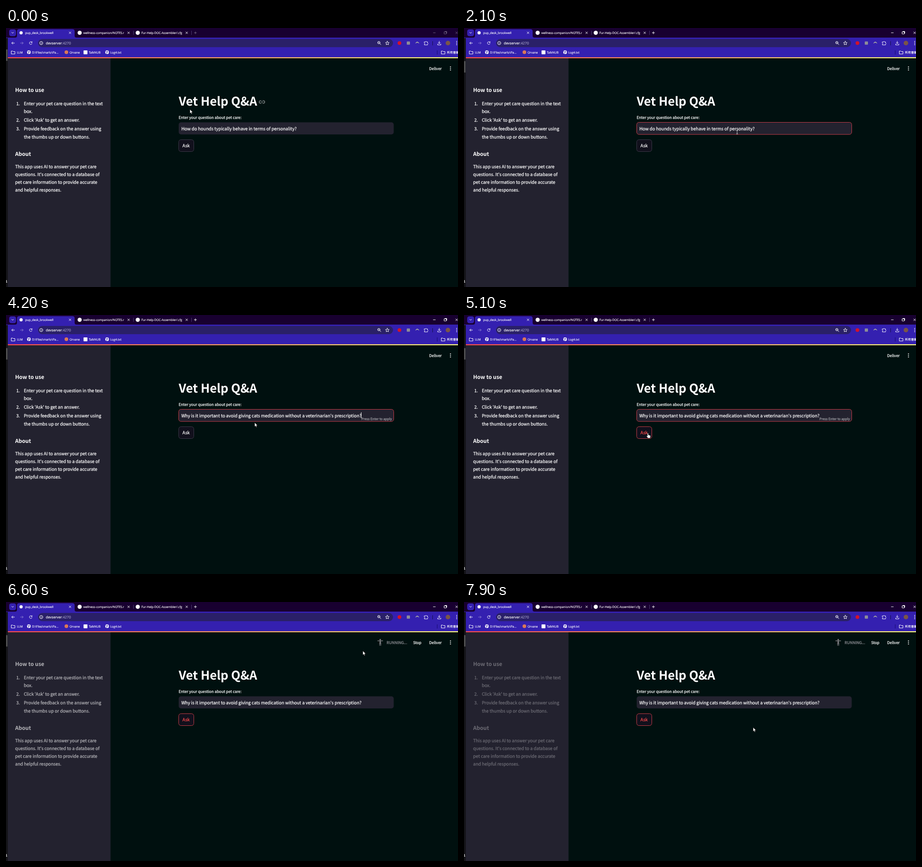
An HTML page for the animation above (8 s loop, 988 by 567 pixels).

```html
<!DOCTYPE html>
<html lang="en">
<head>
<meta charset="utf-8">
<title>Help desk demo</title>
<style>
html, body { margin: 0; width: 100%; height: 100%; overflow: hidden; background: #00100f; }
svg { display: block; }
text { color: #fff; fill: currentColor; stroke: currentColor; stroke-width: .25; white-space: pre; text-rendering: geometricPrecision; }
.page text { font: 9.6px "Noto Sans CJK SC", "Noto Sans CJK JP", "Noto Sans", sans-serif; }
.page .small { font-size: 8.4px; }
.page .head { font-size: 11.7px; font-weight: 600; stroke: none; }
.page .title { font-size: 26.4px; font-weight: 700; stroke: none; }
.page .hint { font-size: 7.2px; color: #a0a0a6; }
.page .muted { color: #929298; }
.chrome text { font: 6.5px "Open Sans", "Noto Sans CJK TC", "Noto Sans", sans-serif; stroke-width: .15; }
.chrome .url { font-size: 7.7px; }
.line { fill: none; stroke: #fff; stroke-width: 1; stroke-linecap: round; stroke-linejoin: round; }
.runner { fill: none; stroke: #7c7c80; stroke-width: 1.3; stroke-linecap: round; stroke-linejoin: round; }
.runner circle.dot { fill: #7c7c80; stroke: none; }
.cursor { fill: #fff; stroke: #000; stroke-width: .6; stroke-linejoin: round; }
</style>
</head>
<body>
<svg width="988" height="567" viewBox="0 0 988 567">
  <defs>
    <linearGradient id="rainbow"><stop stop-color="#ff4b4b"/><stop offset="1" stop-color="#fffd80"/></linearGradient>
    <g id="close"><path class="line" d="M-2-2L2 2M2-2L-2 2"/></g>
    <g id="folder"><path class="line" d="M-4 3V-3H-1L0-2H4V3Z"/></g>
    <g id="globe"><circle r="4" fill="#fff"/><path d="M-3-1Q0-2-.5 1T-1 3M1-3Q0 0 3 0" fill="none" stroke="#3420b0" stroke-width="1.1"/></g>
  </defs>

  <g class="chrome">
    <rect width="988" height="22" fill="#180030"/>
    <rect y="21" width="988" height="44" fill="#3420b0"/>
    <path d="M20 21Q24 21 24 17V7Q24 2.500 29 2.500H145Q150 2.500 150 7V17Q150 21 154 21Z" fill="#3420b0"/>
    <rect x="7" y="3" width="15" height="15" rx="4.500" fill="#3420b0"/>
    <path class="line" d="M12.500 9.500L14.500 11.500L16.500 9.500"/>
    <circle cx="33" cy="10.500" r="3.500" fill="#fff"/>
    <circle cx="161" cy="10.500" r="4.500" fill="#fff"/>
    <circle cx="288" cy="10.500" r="4.500" fill="#fff"/>
    <text x="42" y="12.800">pup_desk_brookwell</text>
    <svg x="169" y="0" width="89" height="21"><text y="12.800">wellness-companion/NOTES.md</text></svg>
    <svg x="296" y="0" width="89" height="21"><text y="12.800">Fur-Help-DOC-Assembler/.cfg</text></svg>
    <use href="#close" x="140" y="10.500"/>
    <use href="#close" x="268" y="10.500"/>
    <use href="#close" x="395" y="10.500"/>
    <path d="M278.500 6V15M405.500 6V15" stroke="#4a3a70"/>
    <g id="controls">
      <path class="line" d="M411.500 10.500H416.500M414 8V13M934 10.500H938.500M958 8.500H962.500V13H958ZM959.500 8.500V7.500H963.500V11.500"/>
      <use href="#close" x="985" y="10.500"/>
    </g>

    <rect x="70" y="24" width="776" height="18" rx="9" fill="#2a2068"/>
    <path class="line" d="M18.500 33H12.500M15 30.500L12.500 33L15 35.500M56.800 31.500A3 3 0 1 0 57 34M57 29.800V31.800H55"/>
    <path class="line" opacity=".4" d="M31.500 33H37.500M35 30.500L37.500 33L35 35.500"/>
    <circle class="line" cx="77" cy="33" r="3.500"/>
    <path class="line" d="M77 33V34.600M77 31.300V31.400"/>
    <text class="url" x="87" y="35.800">devserver<tspan style="color:#a9a4cc">:4270</tspan></text>
    <circle class="line" cx="815" cy="32" r="2.600"/>
    <path class="line" d="M817 34L819.500 36.500M814 32H816M833.500 29L834.700 31.800L837.500 32L835.400 34L836 36.800L833.500 35.300L831 36.800L831.600 34L829.500 32L832.300 31.800Z"/>
    <circle cx="860" cy="33" r="4" fill="#d3122a"/>
    <rect x="876" y="29.500" width="7" height="7" rx="1" fill="#8d8d98"/>
    <path d="M894.500 34Q899 26 903.500 34L899 32Z" fill="#a9a9a4"/>
    <path class="line" d="M914.500 30.500H917Q918 27.500 919.500 30.500H921.500V33Q924 34 921.500 35.500V37H914.500V35Q917 34 914.500 32.500Z"/>
    <path d="M932.500 29V38" stroke="#15104a"/>
    <path class="line" d="M947 29V34M944.800 32L947 34.200L949.200 32M943.500 35V37H950.500V35"/>
    <circle cx="966" cy="33" r="5" fill="#7a5548"/>
    <path d="M985 29.500h.1M985 33h.1M985 36.500h.1" stroke="#fff" stroke-width="1.800" stroke-linecap="round"/>

    <use href="#folder" x="15.500" y="53.500"/>
    <text x="24" y="55.700">LLM</text>
    <use href="#globe" x="50" y="53"/>
    <text x="57" y="55.700">D:\Files\marlo\Pa...</text>
    <circle cx="132" cy="53" r="4" fill="#d97757"/>
    <text x="139" y="55.700">Orvane</text>
    <rect x="169.500" y="49" width="8.500" height="8.500" rx="1" fill="#fff"/>
    <text x="181" y="55.700">TalkNUB</text>
    <use href="#globe" x="221" y="53"/>
    <text x="228" y="55.700">Log4.txt</text>
    <path d="M942.500 49V58" stroke="#180c70"/>
    <use href="#folder" x="955.500" y="53.500"/>
    <text x="964" y="55.700">所有書籤</text>
  </g>

  <g class="page">
    <rect y="65" width="988" height="502" fill="#00100f"/>
    <rect x="3" y="65" width="225.500" height="502" fill="#23222f"/>
    <rect y="22" width="4" height="545" fill="#141418"/>
    <rect id="thumb" width="3.500" height="25" fill="#4b4b4d"/>
    <text x="-1" y="557" style="font-size:7px">1</text>
    <rect x="4" y="64" width="984" height="2.200" fill="url(#rainbow)"/>

    <g id="sidebar">
      <text class="head" x="20" y="140">How to use</text>
      <text x="22.500" y="168.700">1.</text>
      <text x="39" y="168.700">Enter your pet care question in the text</text>
      <text x="39" y="185.800">box.</text>
      <text x="22.500" y="205">2.</text>
      <text x="39" y="205">Click 'Ask' to get an answer.</text>
      <text x="22.500" y="224.300">3.</text>
      <text x="39" y="224.300">Provide feedback on the answer using</text>
      <text x="39" y="241.500">the thumbs up or down buttons.</text>
      <text class="head" x="20" y="280">About</text>
      <text x="20" y="306.700">This app uses AI to answer your pet care</text>
      <text x="20" y="323.900">questions. It's connected to a database of</text>
      <text x="20" y="341">pet care information to provide accurate</text>
      <text x="20" y="358.200">and helpful responses.</text>
    </g>

    <text class="small" x="925" y="91.700">Deliver</text>
    <path d="M971.500 85h.1M971.500 88.500h.1M971.500 92h.1" stroke="#fafafa" stroke-width="2.200" stroke-linecap="round"/>
    <g id="status">
      <text class="small muted" x="832" y="91.700">RUNNING...</text>
      <text class="small" x="890" y="91.700">Stop</text>
      <g class="runner" id="runners" transform="translate(818 88)">
        <g><circle class="dot" cx="2" cy="-5.500" r="1.700"/><path d="M1-3L-1 1L2 3L0 7M-1 1L-3 4H-6M-4-1L-2-3H1L3 0H5"/></g>
        <g><circle class="dot" cy="-5.500" r="1.700"/><path d="M-5.500-3H5.500"/><path d="M0-2V2" stroke-width="3"/><path d="M-1.200 2V7M1.200 2V7"/></g>
        <g><circle class="dot" cx="4" cy="-1" r="1.700"/><path d="M-6 2L-1-1L-3-4L2-5M-8 5Q-6 3-4 5T0 5T4 5T8 5"/></g>
        <g><circle cx="-5" cy="4" r="3.300"/><circle cx="5" cy="4" r="3.300"/><circle class="dot" cx="2" cy="-6" r="1.600"/><path d="M0 5V1L-3-1L0-4L3-1H6"/></g>
        <g><circle class="dot" cx="2" cy="-5.500" r="1.700"/><path d="M1-3L-2 0L2 2L0 6M1-2L5 0M-7 4L7 7"/></g>
        <g><circle class="dot" cx="-1" cy="-5" r="1.700"/><path d="M-2-3L-3 2H2L4 4M-2-1L3 0M-8 4H8L6 6H-6Z"/></g>
      </g>
    </g>

    <text class="title" x="377.500" y="170">Vet Help Q&amp;A</text>
    <path id="anchor" class="line" style="stroke:#a5a8aa;stroke-width:1.200" d="M558 159H556.500A2.800 2.800 0 0 0 556.500 165H558M561 159H562.500A2.800 2.800 0 0 1 562.500 165H561M557 162H562"/>
    <text class="small" x="377.300" y="199">Enter your question about pet care:</text>
    <rect id="field" x="377.500" y="206.500" width="470" height="26.500" rx="5" fill="#23222f"/>
    <rect id="selection" x="383" y="212" width="252" height="16" fill="#2a6fc9"/>
    <text id="question" x="383.200" y="223.800"></text>
    <rect id="caret" y="213" width="1" height="13" fill="#fafafa"/>
    <text id="hint" class="hint" x="843.500" y="229.500" text-anchor="end">Press Enter to apply</text>
    <rect id="button" x="377.500" y="244.500" width="33" height="26" rx="5" fill="#11101c"/>
    <text id="ask" x="385.800" y="261.300">Ask</text>
  </g>

  <g id="pointer" class="cursor">
    <path id="arrow" d="M0 0V9L2 7.200L3.400 10.300L4.900 9.700L3.500 6.600H6.300Z"/>
    <path id="beam" d="M-1.800-4H1.800M0-4V4M-1.800 4H1.800" stroke="#ddd" stroke-width=".9"/>
    <path id="hand" d="M-1 1Q0-.5 1 1V4.500L5 5.500Q6 6 5.800 8L5 11.500H0L-3 7.500Q-3.500 6-1 7Z"/>
  </g>
</svg>
<script>
const LOOP = 8000, STEP = 100, RED = "#ff4b4b", BORDER = "#c83c48";
const FIRST = "How do hounds typically behave in terms of personality?";
const SECOND = "Why is it important to avoid giving cats medication without a veterinarian's prescription?";
// Pointer stops: time, x, y
const PATH = [
  [0, 402, 178], [500, 440, 217], [600, 440, 217], [1400, 597, 228], [2300, 597, 228],
  [3200, 543.5, 235.5], [4200, 543.5, 235.5], [4900, 402, 258], [5200, 402, 258],
  [5800, 418.5, 280], [5900, 422, 281], [6600, 780, 107], [6800, 784, 104], [7900, 632, 274.5]
];
const $ = id => document.getElementById(id);
const show = (el, on) => { el.style.display = on ? "" : "none"; };
const within = (t, a, b) => t >= a && t < b;
const clamp = v => Math.min(1, Math.max(0, v));

function pointerAt(t) {
  const i = PATH.findIndex(p => p[0] > t);
  if (i < 0) return PATH[PATH.length - 1].slice(1);
  const [t0, x0, y0] = PATH[i - 1], [t1, x1, y1] = PATH[i];
  const u = (t - t0) / (t1 - t0), k = u * u * (3 - 2 * u);
  return [x0 + (x1 - x0) * k, y0 + (y1 - y0) * k];
}

function draw(t) {
  const [x, y] = pointerAt(t);
  const overField = within(x, 377, 848) && within(y, 207, 233.5);
  const overButton = within(x, 377, 411) && within(y, 244, 271);
  const active = t >= 1500, pasted = t >= 4200, asked = t >= 5200;

  $("pointer").setAttribute("transform", `translate(${x} ${y})`);
  show($("pointer"), !within(t, 3300, 4000));
  show($("arrow"), !overField && !overButton);
  show($("beam"), overField);
  show($("hand"), overButton);

  $("controls").style.opacity = active ? 1 : .35;
  $("thumb").setAttribute("y", active ? 72.5 : 47);
  show($("anchor"), t < 300);

  $("field").setAttribute("stroke", within(t, 1600, 5200) ? BORDER : "none");
  $("question").textContent = pasted ? SECOND : FIRST;
  show($("selection"), within(t, 3300, 4200));
  show($("caret"), within(t, 1600, 2100) || within(t, 2600, 3100) || within(t, 4200, 4700));
  $("caret").setAttribute("x", pasted ? 776 : 594);
  show($("hint"), pasted && !asked);

  const hot = overButton || asked;
  $("button").setAttribute("stroke", hot ? BORDER : "#3c3848");
  $("ask").style.color = hot ? RED : "";

  show($("status"), t >= 5400);
  const pose = Math.floor(Math.max(0, t - 5200) / 200) % 6;
  [...$("runners").children].forEach((el, i) => show(el, i === pose));
  $("sidebar").style.opacity = 1 - .67 * clamp((t - 5850) / 1500);
}

function tick(now) {
  draw(Math.floor(now % LOOP / STEP) * STEP);
  requestAnimationFrame(tick);
}
draw(0);
requestAnimationFrame(tick);
</script>
</body>
</html>
```
